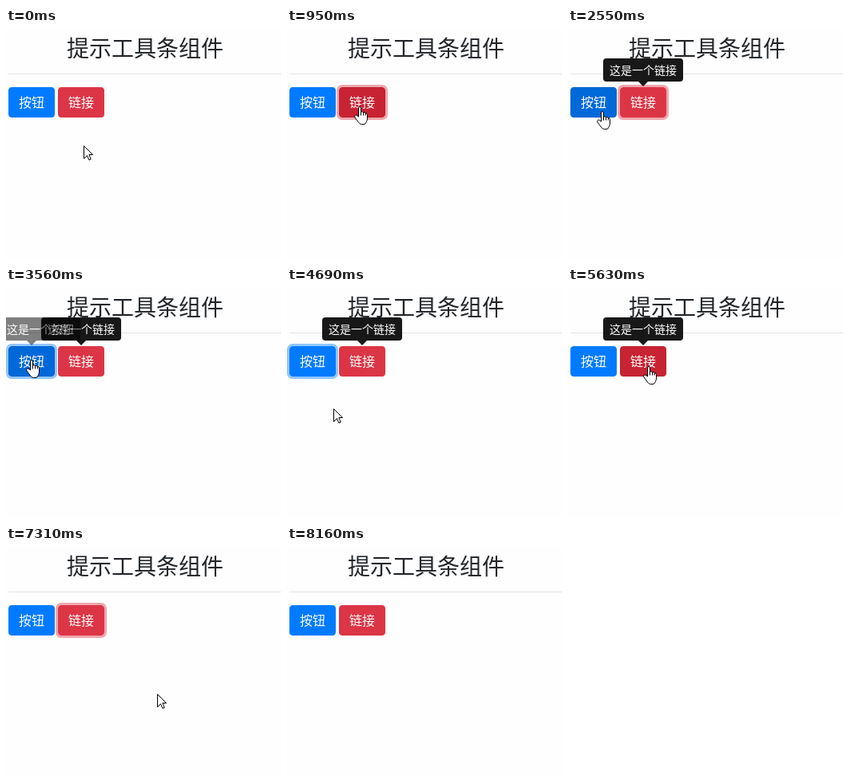
These frames come from a looping animation (344 by 289 pixels, 8.26 s). An HTML page:

```html
<!DOCTYPE html>
<html lang="zh-CN">
<head>
<meta charset="utf-8">
<title>提示工具条组件</title>
<style>
  html, body { margin: 0; width: 100%; height: 100%; overflow: hidden; background: #fefefe; }
  svg { display: block; }
  text { font: 500 16px "Noto Sans CJK SC", "Noto Sans CJK", sans-serif; fill: #fff; text-anchor: middle; }
  .title { font-size: 28px; fill: #212529; }
  .tip text { font-size: 14px; }
  .ring { fill: none; stroke-width: 3; stroke-opacity: .5; }
  .pointer path { fill: #fff; stroke: #000; stroke-linejoin: round; }
</style>
</head>
<body>
<svg width="344" height="289" viewBox="0 0 344 289">
  <text class="title" x="174" y="36">提示工具条组件</text>
  <path d="M3 57.5H344" stroke="#000" stroke-opacity=".1"/>
  <g id="buttons"></g>
  <g id="tips"></g>
  <g id="arrow" class="pointer">
    <path d="M.5 .5V16.5L4.5 12.5L6.9 18.2L9.2 17.2L6.9 11.5H11.5Z"/>
  </g>
  <g id="hand" class="pointer">
    <path d="M-.5 13V2Q-.5 .5 1 .5T2.5 2V7Q4 6 5.5 7.5Q7.2 7 8.3 8.5Q10.5 8 10.5 10.5V15Q10.5 17.5 9.3 19.5Q8.5 22.5 6 22.5H3.5Q1 22.5 -.5 20L-5 14Q-6 12 -4.5 11.2T-2 11.8Z"/>
    <path d="M2.5 7V11.5M5.5 7.5V11.5M8.3 8.5V11.5" fill="none"/>
  </g>
</svg>
<script>
const LOOP = 8260;
const STEP = 138; // the picture moves on in steps of this many ms
const byId = id => document.getElementById(id);
const clamp = v => Math.min(1, Math.max(0, v));
const stepsSince = (start, t) => t < start ? 0 : Math.floor((t - start) / STEP) + 1;

const home = { x: 97, y: 147 };
const moves = [
  { start: 440, end: 820, x: 90, y: 98 },
  { start: 1180, end: 1460, x: 84, y: 153 },
  { start: 2130, end: 2840, x: 31, y: 91 },
  { start: 4390, end: 4690, x: 58, y: 152 },
  { start: 4820, end: 5630, x: 100, y: 99 },
  { start: 6060, end: 6750, x: 116, y: 166 },
  { start: 7310, end: 7590, x: 284, y: 209 }
];
const pointerGone = 7730;

const buttons = [
  { x: 65, label: '链接', tip: '这是一个链接', tipX: 44, arrowX: 94,
    normal: ['#dc3545', '#dc3545'], hover: ['#c82333', '#bd2130'], ring: '#e15361',
    focus: [[950, 2840], [6060, 8160]], tipIn: 1610, tipOut: 6480 },
  { x: 3, label: '按钮', tip: '这是一个按钮', tipX: -7, arrowX: 32,
    normal: ['#007bff', '#007bff'], hover: ['#0069d9', '#0062cc'], ring: '#268fff',
    focus: [[2840, 4820]], tipIn: 3560, tipOut: 4390 }
];

for (const b of buttons) {
  byId('buttons').insertAdjacentHTML('beforeend', `<g>
    <rect class="ring" x="${b.x - 1.5}" y="72.5" width="61" height="41" rx="5.5" stroke="${b.ring}"/>
    <rect x="${b.x + .5}" y="74.5" width="57" height="37" rx="3.5"/>
    <text x="${b.x + 29}" y="99">${b.label}</text></g>`);
  [b.ringShape, b.face] = byId('buttons').lastElementChild.children;
  byId('tips').insertAdjacentHTML('beforeend', `<g class="tip">
    <rect x="${b.tipX}" y="38" width="100" height="29" rx="4"/>
    <path d="M${b.arrowX - 6} 67h12l-6 6z"/>
    <text x="${b.tipX + 50}" y="58">${b.tip}</text></g>`);
  b.tipShape = byId('tips').lastElementChild;
}

// Each move eases out towards its end point, one step at a time.
function pointerAt(t) {
  let { x, y } = home;
  for (const move of moves) {
    const k = clamp(stepsSince(move.start, t) / stepsSince(move.start, move.end));
    const eased = 1 - (1 - k) ** 1.4;
    x += (move.x - x) * eased;
    y += (move.y - y) * eased;
  }
  return [Math.round(x), Math.round(y)];
}

function tipOpacity(b, t) {
  const appear = clamp(.55 * stepsSince(b.tipIn, t));
  const remain = clamp(1 - .22 * stepsSince(b.tipOut, t) ** 2);
  return .9 * appear * remain;
}

const show = (el, visible) => el.setAttribute('visibility', visible ? 'visible' : 'hidden');

function draw(t) {
  const [x, y] = pointerAt(t);
  let hovering = false;
  for (const b of buttons) {
    const over = t < pointerGone && x >= b.x && x < b.x + 58 && y >= 74 && y < 112;
    hovering ||= over;
    const [fill, border] = over ? b.hover : b.normal;
    b.face.setAttribute('fill', fill);
    b.face.setAttribute('stroke', border);
    show(b.ringShape, b.focus.some(([from, to]) => t >= from && t < to));
    b.tipShape.setAttribute('opacity', tipOpacity(b, t));
  }
  for (const id of ['arrow', 'hand']) {
    byId(id).setAttribute('transform', `translate(${x} ${y})`);
    show(byId(id), t < pointerGone && hovering === (id === 'hand'));
  }
}

const start = performance.now();
function tick() {
  draw((performance.now() - start) % LOOP);
  requestAnimationFrame(tick);
}
tick();
</script>
</body>
</html>
```
